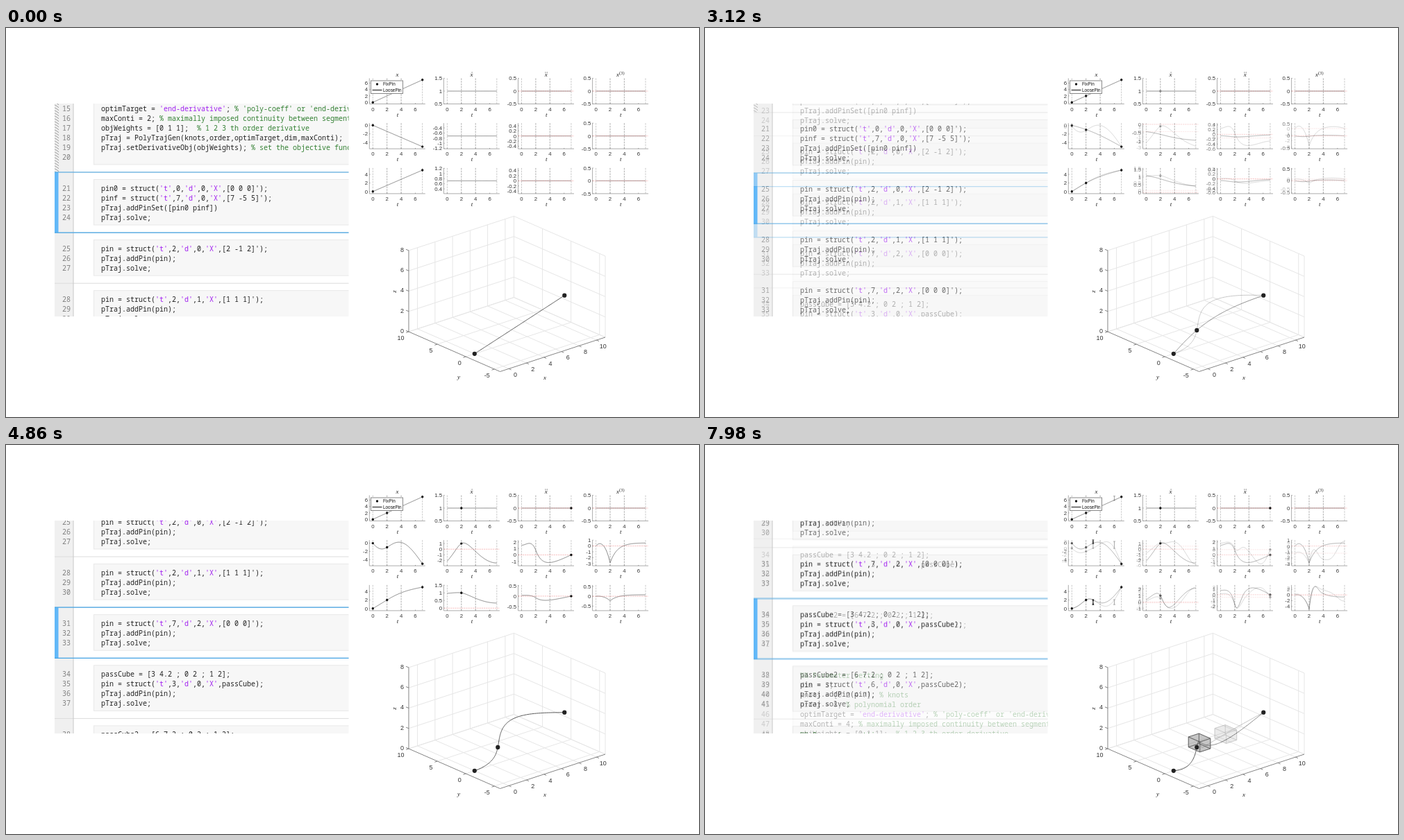
An HTML page that plays this animation: 998x561 px, repeating every 8000 ms.

```html
<!DOCTYPE html>
<html lang="en">
<head>
<meta charset="utf-8">
<title>Trajectory pins</title>
<style>
  html, body { margin: 0; width: 100%; height: 100%; overflow: hidden; background: #fff; }
  svg { display: block; width: 998px; height: 561px; }
  text { white-space: pre; }
  .code { font: 10px "Noto Sans Mono", monospace; fill: #222; }
  .num { fill: #808080; }
  .str { fill: #a020f0; }
  .com { fill: #338033; }
  .tick { font: 7.8px "Liberation Sans", sans-serif; fill: #333; }
  .tick3 { font: 9px "Liberation Sans", sans-serif; fill: #333; }
  .legend { font: 6.4px "Liberation Sans", sans-serif; fill: #111; }
  .math { font: italic 9px "Liberation Serif", serif; fill: #222; }
</style>
</head>
<body>
<svg id="stage" viewBox="0 0 998 561">
  <defs>
    <clipPath id="panel"><rect x="70" y="109" width="423.5" height="307"/></clipPath>
    <pattern id="hatch" width="6" height="4" patternUnits="userSpaceOnUse">
      <path d="M-1 -1L7 5M-1 3L7 9M-1 -5L7 1" stroke="#999" stroke-width="1"/>
    </pattern>
  </defs>
</svg>
<script>
const tag = (name, attrs, body = '') =>
  `<${name} ${Object.entries(attrs).map(([k, v]) => `${k}="${v}"`).join(' ')}>${body}</${name}>`;
const line = (x1, y1, x2, y2, stroke, width = 1, dash = 'none') =>
  tag('line', { x1, y1, x2, y2, stroke, 'stroke-width': width, 'stroke-dasharray': dash });
const rect = (x, y, width, height, fill, stroke = 'none') =>
  tag('rect', { x, y, width, height, fill, stroke });
const dot = (x, y, r, fill = '#222') => tag('circle', { cx: x, cy: y, r, fill });
const label = (x, y, cls, body, anchor = 'middle') =>
  tag('text', { x, y, class: cls, 'text-anchor': anchor }, body);
const path = (points, stroke, width, fill = 'none') => tag('path', {
  d: 'M' + points.map(p => p.map(v => v.toFixed(2)).join(' ')).join('L'),
  stroke, 'stroke-width': width, fill
});
const range = n => Array.from({ length: n }, (_, i) => i);

// ---------- code listing ----------
const FIRST_LINE = 14, LINE = 14, GAP = 31.1;
const target = "optimTarget = 'end-derivative'; % 'poly-coeff' or 'end-derivative'";
const conti = n => `maxConti = ${n}; % maximally imposed continuity between segments`;
const weights = 'objWeights = [0 1 1];  % 1 2 3 th order derivative';
const addAndSolve = ['pTraj.addPin(pin);', 'pTraj.solve;'];
const pinCode = (t, d, value) => `pin = struct('t',${t},'d',${d},'X',${value});`;

const sections = [
  ['order = 8; % polynomial order', target, conti(2), weights,
    'pTraj = PolyTrajGen(knots,order,optimTarget,dim,maxConti);',
    'pTraj.setDerivativeObj(objWeights); % set the objective function', ''],
  ["pin0 = struct('t',0,'d',0,'X',[0 0 0]');", "pinf = struct('t',7,'d',0,'X',[7 -5 5]');",
    'pTraj.addPinSet([pin0 pinf])', 'pTraj.solve;'],
  [pinCode(2, 0, "[2 -1 2]'"), ...addAndSolve],
  [pinCode(2, 1, "[1 1 1]'"), ...addAndSolve],
  [pinCode(7, 2, "[0 0 0]'"), ...addAndSolve],
  ['passCube = [3 4.2 ; 0 2 ; 1 2];', pinCode(3, 0, 'passCube'), ...addAndSolve],
  ['passCube2 = [6 7.2 ; 0 2 ; 1 2];', pinCode(6, 0, 'passCube2'), ...addAndSolve],
  ['%% Parameter setting', 'dim = 3;', 'knots = [0 2 4 7]; % knots', 'order = 8; % polynomial order',
    target, conti(4), weights, '']
];

const highlight = text => text.replace(/%.*|'[^']*'/g, part =>
  `<tspan class="${part[0] === '%' ? 'com' : 'str'}">${part}</tspan>`);

function listing(selected, selectedTop) {
  const heights = sections.map(s => s.length * LINE + GAP);
  let y = selectedTop - heights.slice(0, selected).reduce((a, b) => a + b, 0);
  let number = FIRST_LINE, out = rect(70, 109, 27, 307, '#f0f0f0'), marks = '';
  sections.forEach((lines, i) => {
    const h = heights[i];
    out += line(70, y, 494, y, '#dcdcdc');
    out += rect(126.5, y + 10.5, 400, lines.length * LINE + 9.5, '#f7f7f7', '#e8e8e8');
    if (i === 0) out += rect(70, y, 6, h, 'url(#hatch)');
    if (i === selected) {
      marks = rect(70, y, 5.5, h, '#62b8f8') +
        [y, y + h].map(v => line(70, v, 494, v, '#45a5e6', 1.2)).join('');
    }
    lines.forEach((text, k) => {
      const base = y + 26.7 + k * LINE;
      out += label(81, base, 'code num', number++, 'start') +
        label(137, base, 'code', highlight(text), 'start');
    });
    y += h;
  });
  return tag('g', { 'clip-path': 'url(#panel)' }, out + line(97, 109, 97, 416, '#c8c8c8') + marks);
}

// ---------- trajectory: piecewise polynomials of least squared 2nd and 3rd derivative ----------
const KNOTS = [0, 2, 4, 7], TERMS = 8, SEGMENTS = KNOTS.length - 1, SIZE = SEGMENTS * TERMS;
const pins = [
  { t: 0, d: 0, at: [0, 0, 0], from: 0 },
  { t: 7, d: 0, at: [7, -5, 5], from: 0 },
  { t: 2, d: 0, at: [2, -1, 2], from: 1 },
  { t: 2, d: 1, at: [1, 1, 1], from: 2 },
  { t: 7, d: 2, at: [0, 0, 0], from: 3 },
  { t: 3, d: 0, box: [[3, 4.2], [0, 2], [1, 2]], from: 4 },
  { t: 6, d: 0, box: [[6, 7.2], [0, 2], [1, 2]], from: 5 }
];
const fixedAt = stage => pins.filter(p => p.at && p.from <= stage);
const looseAt = stage => pins.filter(p => p.box && p.from <= stage);

const falling = (k, d) => range(d).reduce((f, i) => f * (k - i), 1);
const segmentAt = t => range(SEGMENTS).filter(s => t >= KNOTS[s]).pop();
const span = s => KNOTS[s + 1] - KNOTS[s];

function basis(t, d, s = segmentAt(t)) {
  const row = Array(SIZE).fill(0), u = (t - KNOTS[s]) / span(s);
  for (let k = d; k < TERMS; k++) row[s * TERMS + k] = falling(k, d) * u ** (k - d) / span(s) ** d;
  return row;
}

function energy(i, j) {
  const s = Math.floor(i / TERMS), k = i % TERMS, l = j % TERMS;
  if (s !== Math.floor(j / TERMS)) return 0;
  return [2, 3].reduce((sum, d) => k < d || l < d ? sum :
    sum + falling(k, d) * falling(l, d) / (k + l - 2 * d + 1) * span(s) ** (1 - 2 * d), 0);
}

function solveLinear(m) {
  const n = m.length;
  for (let c = 0; c < n; c++) {
    let best = c;
    for (let r = c + 1; r < n; r++) if (Math.abs(m[r][c]) > Math.abs(m[best][c])) best = r;
    [m[c], m[best]] = [m[best], m[c]];
    for (let r = 0; r < n; r++) {
      if (r === c) continue;
      const f = m[r][c] / m[c][c];
      if (f) for (let k = c; k <= n; k++) m[r][k] -= f * m[c][k];
    }
  }
  return m.map((row, i) => row[n] / row[i]);
}

const continuity = KNOTS.slice(1, -1).flatMap((t, s) => [0, 1, 2].map(d => {
  const after = basis(t, d, s + 1);
  return { row: basis(t, d, s).map((v, i) => v - after[i]), value: 0 };
}));

function minimise(constraints) {
  const count = constraints.length;
  const top = range(SIZE).map(i =>
    [...range(SIZE).map(j => energy(i, j)), ...constraints.map(c => c.row[i]), 0]);
  const bottom = constraints.map(c => [...c.row, ...Array(count).fill(0), c.value]);
  const coefs = solveLinear([...top, ...bottom]);
  return (t, d) => basis(t, d).reduce((sum, b, i) => sum + b * coefs[i], 0);
}

// A box pin becomes an equality at its nearest side once the curve leaves the box.
function trajectory(dim, stage) {
  const constraints = [...continuity,
    ...fixedAt(stage).map(p => ({ row: basis(p.t, p.d), value: p.at[dim] }))];
  let free = looseAt(stage);
  for (;;) {
    const curve = minimise(constraints);
    const nearest = p => Math.min(p.box[dim][1], Math.max(p.box[dim][0], curve(p.t, 0)));
    const broken = free.filter(p => Math.abs(curve(p.t, 0) - nearest(p)) > 1e-5);
    if (!broken.length) return curve;
    for (const p of broken) constraints.push({ row: basis(p.t, 0), value: nearest(p) });
    free = free.filter(p => !broken.includes(p));
  }
}
const times = range(141).map(i => i / 20);

// ---------- small plots ----------
const PLOT_H = 37, MARGIN = 0.5;

function tickStep(size, dim, col) {
  if (size > 5.5) return 2;
  if (size > 2) return 1;
  return size < 1.15 && dim && col < 3 ? 0.2 : 0.5;
}

function plot(curve, dim, col, stage) {
  const values = times.map(t => curve(t, col));
  const lo = Math.min(...values) - MARGIN, hi = Math.max(...values) + MARGIN;
  const step = tickStep(hi - lo, dim, col);
  const left = 523.3 + 107.1 * col, top = 72.5 + 64.7 * dim, bottom = top + PLOT_H;
  const px = t => left + 5 + 10.2 * t;
  const py = v => bottom - (v - lo) / (hi - lo) * PLOT_H;
  let out = '';
  for (const t of KNOTS) out += line(px(t), top, px(t), bottom, t % 7 ? '#999' : '#bbb', 0.8, '2.5 1.3');
  out += path([[left, top], [left, bottom], [left + 80.5, bottom]], '#999', 0.8);
  for (const t of [0, 2, 4, 6]) {
    out += line(px(t), bottom, px(t), bottom - 1.2, '#777', 0.7) + label(px(t), bottom + 10.2, 'tick', t);
  }
  for (let k = Math.ceil(lo / step - 1e-4); k * step <= hi + 1e-4; k++) {
    const y = py(k * step);
    out += line(left, y, left + 1.2, y, '#777', 0.7) +
      label(left - 2.3, y + 2.8, 'tick', +(k * step).toFixed(1), 'end');
  }
  out += label(px(3.5), bottom + 18, 'math', 't');
  out += path(times.map((t, i) => [px(t), py(values[i])]), '#777', 0.9);
  if (col && lo < 0 && hi > 0) {
    out += tag('g', { opacity: 0.55 }, line(left, py(0), left + 80.5, py(0), '#f08080', 0.9, '2.2 1'));
  }
  for (const p of fixedAt(stage)) if (p.d === col) out += dot(px(p.t), py(p.at[dim]), 1.7, '#111');
  for (const p of looseAt(stage)) {
    if (p.d !== col) continue;
    const x = px(p.t), [a, b] = p.box[dim].map(v => py(Math.min(v, hi)));
    const arrow = (y, way) => path([[x - 1.6, y + way], [x + 1.6, y + way], [x, y - 2 * way]], 'none', 0, '#111');
    out += line(x, a, x, b, '#111', 1.1) + arrow(a, 1) + arrow(b, -1);
  }
  return out;
}

function titlesAndLegend() {
  const at = col => 563.5 + 107.1 * col;
  return [0, 1, 2].map(c => label(at(c), 69.5, 'math', 'x')).join('') +
    dot(at(1) + 0.5, 64, 0.6) + dot(at(2) - 0.8, 64, 0.6) + dot(at(2) + 1.6, 64, 0.6) +
    label(at(3), 69.5, 'math', 'x<tspan dy="-2.5" font-size="6.5" font-style="normal">(3)</tspan>') +
    rect(525.5, 76, 46, 18.5, '#fff', '#888') + dot(534.5, 81, 1.7, '#111') +
    line(527.5, 89.5, 541.5, 89.5, '#222', 1.1) +
    label(543, 83.4, 'legend', 'FixPin', 'start') + label(543, 91.9, 'legend', 'LoosePin', 'start');
}

// ---------- space plot ----------
const project = (x, y, z) => [
  711.5 + 12.625 * (x + 1) - 8.22 * (y + 6),
  495.5 - 4.125 * (x + 1) - 3.594 * (y + 6) - 14.64 * z
];
const edge = (points, color, width = 1) => path(points.map(p => project(...p)), color, width);

function spaceAxes() {
  const grid = '#e6e6e6', dark = '#777';
  const xs = range(6).map(i => 2 * i), ys = range(4).map(i => 5 * i - 5), zs = range(5).map(i => 2 * i);
  let out = '';
  for (const x of [...xs, 11]) out += edge([[x, -6, 0], [x, 10, 0], [x, 10, 8]], grid);
  for (const y of ys) out += edge([[-1, y, 0], [11, y, 0], [11, y, 8]], grid);
  for (const z of zs) out += edge([[-1, 10, z], [11, 10, z], [11, -6, z]], grid);
  out += edge([[11, -6, 0], [11, -6, 8]], grid);
  out += edge([[-1, 10, 8], [-1, 10, 0], [-1, -6, 0], [11, -6, 0]], dark, 0.9);
  for (const x of xs) {
    const [u, v] = project(x, -6, 0);
    out += line(u, v, u + 3.5, v + 1.5, dark, 0.9) + label(u + 9.3, v + 11.8, 'tick3', x);
  }
  for (const y of ys) {
    const [u, v] = project(-1, y, 0);
    out += line(u, v, u - 3.8, v + 1.3, dark, 0.9) + label(u - 6.5, v + 11.8, 'tick3', y, 'end');
  }
  for (const z of zs) {
    const [u, v] = project(-1, 10, z);
    out += line(u, v, u - 4, v - 1.6, dark, 0.9) + label(u - 7, v + 1.8, 'tick3', z, 'end');
  }
  return out + label(776, 506.5, 'math', 'x') + label(652, 505.5, 'math', 'y') +
    tag('g', { transform: 'translate(561.5 380) rotate(-90)' }, label(0, 0, 'math', 'z'));
}

function cubeShape([x, y, z]) {
  const corner = (i, j, k) => project(x[i], y[j], z[k]);
  const face = pick => path([[0, 0], [1, 0], [1, 1], [0, 1], [0, 0]].map(([a, b]) => corner(...pick(a, b))),
    '#555', 0.6, 'rgba(120,120,120,.24)');
  return [0, 1].map(s =>
    face((a, b) => [s, a, b]) + face((a, b) => [a, s, b]) + face((a, b) => [a, b, s])).join('');
}

function space(curves, stage) {
  return spaceAxes() + looseAt(stage).map(p => cubeShape(p.box)).join('') +
    path(times.map(t => project(...curves.map(c => c(t, 0)))), '#555', 1) +
    fixedAt(stage).filter(p => p.d === 0).map(p => dot(...project(...p.at), 3.1)).join('');
}

// ---------- scenes and timing ----------
const selectedTops = [208, 209, 228.7, 234.2, 221, 222.4];
const stageEl = document.getElementById('stage');
const scenes = selectedTops.map((top, i) => {
  const g = document.createElementNS('http://www.w3.org/2000/svg', 'g');
  const curves = range(3).map(dim => trajectory(dim, i));
  const plots = curves.map((c, dim) => range(4).map(col => plot(c, dim, col, i)).join('')).join('');
  g.innerHTML = rect(0, 0, 998, 561, '#fff') + listing(i + 1, top) + plots + titlesAndLegend() + space(curves, i);
  stageEl.append(g);
  return g;
});

const LOOP = 8000, HOLD = 1500, FADE_STEP = 60, CYCLE = HOLD + 2 * FADE_STEP;

function render(time) {
  const since = time % LOOP - HOLD;
  const current = Math.floor(since / CYCLE) + 1;
  const mix = since < 0 ? 1 : Math.min(3, Math.floor((since % CYCLE) / FADE_STEP) + 1) / 3;
  scenes.forEach((g, i) => {
    g.style.display = i === current || (i === current - 1 && mix < 1) ? '' : 'none';
    g.setAttribute('opacity', i === current ? mix : 1);
  });
}

const start = performance.now();
function tick() {
  render(performance.now() - start);
  requestAnimationFrame(tick);
}
tick();
</script>
</body>
</html>
```
